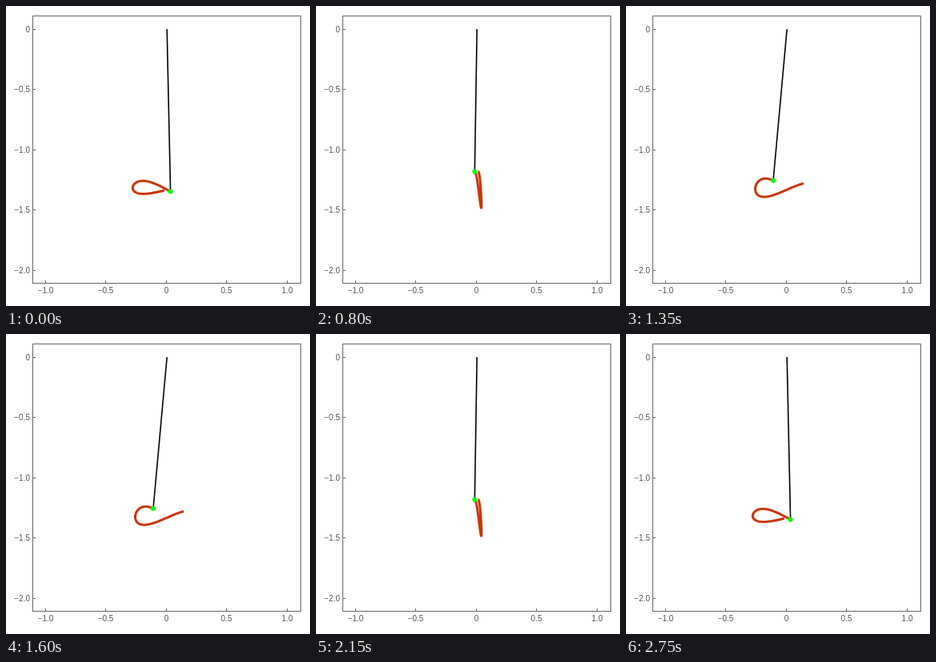
An HTML page for the animation above (3000 ms loop, 380 by 376 pixels).

```html
<!DOCTYPE html>
<html>
<head>
<meta charset="utf-8">
<title>Spring pendulum</title>
<style>
  html, body { margin: 0; width: 100%; height: 100%; overflow: hidden; background: #fff; }
  svg { display: block; }
  text { font: 10px "Liberation Sans", Arial, sans-serif; fill: #555; }
</style>
</head>
<body>
<svg width="380" height="376" viewBox="0 0 380 376">
  <g id="axes" fill="none" stroke="#666">
    <rect x="33.5" y="12.5" width="335" height="335"/>
  </g>
  <g id="labels"></g>
  <line id="rod" x1="201.2" y1="29" stroke="#000" stroke-width="1.6"/>
  <path id="trail" fill="none" stroke="#c30" stroke-width="3" stroke-linejoin="round"/>
  <circle id="bob" r="3" fill="#0f0"/>
</svg>
<script>
const UNIT = 151, ORIGIN_X = 201.2, ORIGIN_Y = 29;
const el = id => document.getElementById(id);
const px = x => ORIGIN_X + UNIT * x;
const py = y => ORIGIN_Y - UNIT * y;

// Axis ticks and labels
const caption = v => v ? v.toFixed(1).replace('-', '−') : '0';
let ticks = '', labels = '';
for (const v of [-1, -0.5, 0, 0.5, 1]) {
  const x = Math.floor(px(v)) - 0.5;
  ticks += `M${x} 347v-3`;
  labels += `<text x="${x}" y="360" text-anchor="middle">${caption(v)}</text>`;
}
for (const v of [0, -0.5, -1, -1.5, -2]) {
  const y = Math.floor(py(v)) + 0.5;
  ticks += `M34 ${y}h3`;
  labels += `<text x="30" y="${y + 3}" text-anchor="end">${caption(v)}</text>`;
}
el('axes').innerHTML += `<path d="${ticks}"/>`;
el('labels').innerHTML = labels;

// Spring pendulum: rest length 1, gravity 1, stiffness 3
function rates([x, y, vx, vy]) {
  const r = Math.hypot(x, y), pull = -3 * (r - 1) / r;
  return [vx, vy, pull * x, pull * y - 1];
}
function advance(s, h) {
  const shift = (k, f) => s.map((v, i) => v + f * k[i]);
  const a = rates(s), b = rates(shift(a, h / 2)), c = rates(shift(b, h / 2)), d = rates(shift(c, h));
  return s.map((v, i) => v + h / 6 * (a[i] + 2 * b[i] + 2 * c[i] + d[i]));
}

// Orbit computed both ways from a lowest point of the bounce
const H = 0.01, START = [0.0355, -4 / 3 - 0.1505, -0.0122, 0];
function solve(h, steps) {
  const states = [START];
  for (let i = 0; i < steps; i++) states.push(advance(states[i], h));
  return states;
}
const past = solve(-H, 5200), future = solve(H, 6200);
const place = i => i < 0 ? past[-i] : future[i];

const TRAIL = 366, STEP = 4.15, MIDDLE = 1.82, FIRST = -44.3;

function draw(ms) {
  const n = Math.floor(ms % 3000 / 50);
  const t = Math.max(FIRST, MIDDLE + STEP * (Math.min(n, 59 - n) - 16));
  const end = Math.round(t / H), points = [];
  for (let i = end - TRAIL; i <= end; i += 6) {
    const [x, y] = place(i);
    points.push(px(x).toFixed(2) + ' ' + py(y).toFixed(2));
  }
  const [x, y] = place(end);
  el('trail').setAttribute('d', 'M' + points.join('L'));
  el('rod').setAttribute('x2', px(x));
  el('rod').setAttribute('y2', py(y));
  el('bob').setAttribute('cx', px(x));
  el('bob').setAttribute('cy', py(y));
}
const began = performance.now();
function tick() {
  draw(performance.now() - began);
  requestAnimationFrame(tick);
}
tick();
</script>
</body>
</html>
```
